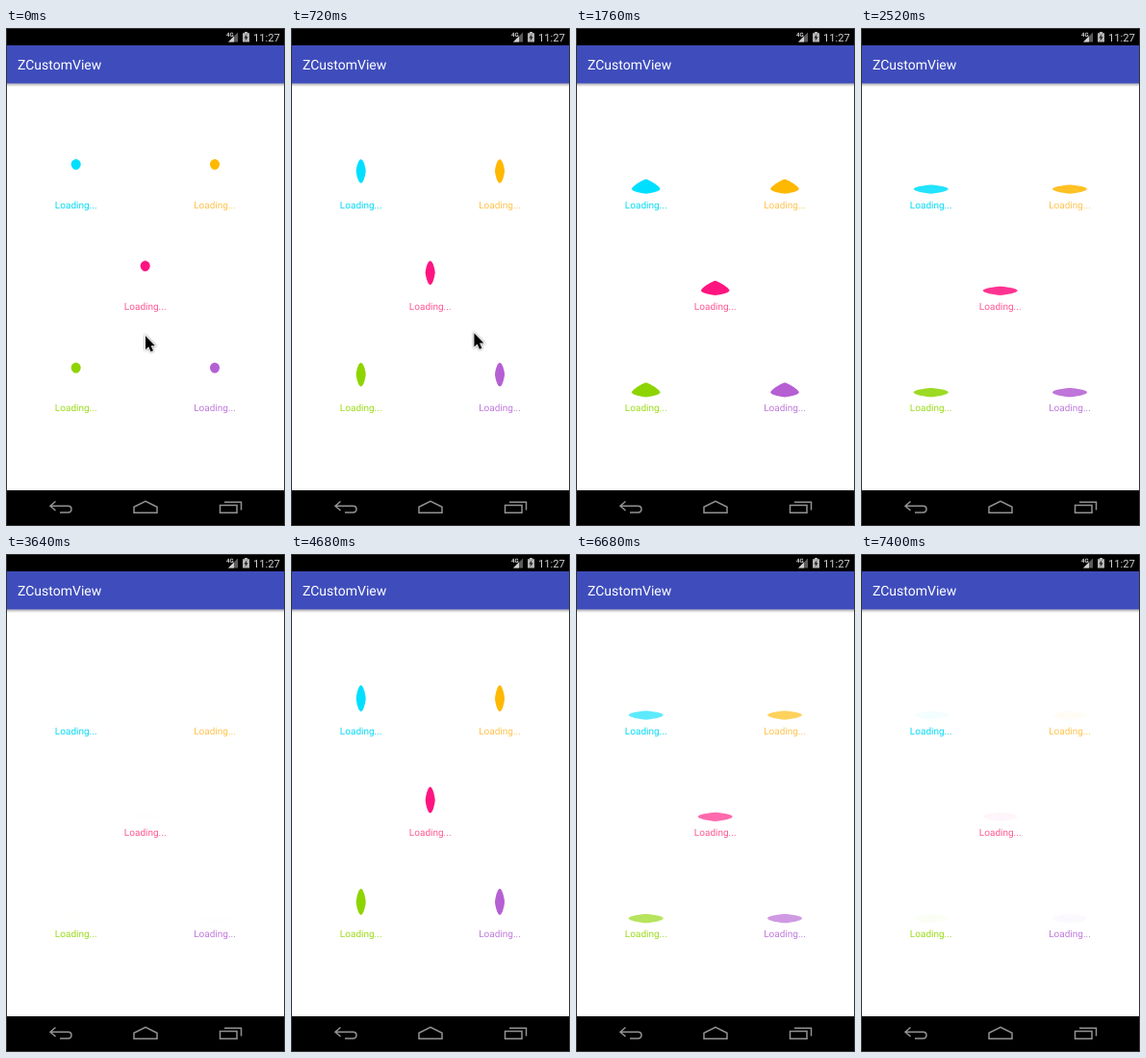
Recreate the animation shown at these times as an HTML page. Size 290 by 516 pixels, loop 7520 ms.

```html
<!DOCTYPE html>
<html lang="en">
<head>
<meta charset="utf-8">
<title>ZCustomView</title>
<style>
  html, body { margin: 0; width: 290px; height: 516px; overflow: hidden; background: #fff; }
  svg { display: block; font-family: Roboto, "Open Sans", sans-serif; text-rendering: geometricPrecision; }
</style>
</head>
<body>
<svg width="290" height="516" viewBox="0 0 290 516">
  <defs>
    <linearGradient id="shade" x2="0" y2="1">
      <stop stop-color="#000" stop-opacity=".3"/>
      <stop offset="1" stop-color="#000" stop-opacity="0"/>
    </linearGradient>
  </defs>

  <rect width="290" height="18"/>
  <rect y="18" width="290" height="39.5" fill="#3f4dbc"/>
  <rect y="57.5" width="290" height="3.5" fill="url(#shade)"/>
  <rect y="479" width="290" height="37"/>
  <rect x=".5" y=".5" width="289" height="515" fill="none" stroke="#333"/>
  <text x="12" y="43" font-size="14" fill="#fff">ZCustomView</text>

  <!-- status icons -->
  <g fill="#d0d0d0">
    <text x="257" y="14" font-size="11.2">11:27</text>
    <text x="229" y="9" font-size="6" font-weight="700">4G</text>
    <path d="M231 14.5L241 4.5V14.5Z" fill="#5c5c5c"/>
    <path d="M231 14.5L237 8.5V14.5Z"/>
    <path d="M246 5.2h2v-1.2h3v1.2h2v9.3h-7Z" fill="#b4b4b4"/>
    <path d="M250.3 6.2L247.4 10.4H249.2L248.6 13.4L251.6 9.2H249.8Z" fill="#222"/>
  </g>

  <!-- navigation icons -->
  <g fill="none" stroke="#929292" stroke-width="1.5">
    <path d="M51.5 490.5L46 495.2L51.5 500M46.5 495.2H64.5Q68 495.2 68 498.5T64.5 502H56"/>
    <path d="M133 502.3V496.3L145 490.3L157 496.3V502.3Z"/>
    <path d="M222.5 494.5H240V502.3H222.5ZM227 491.3H244.5V499.5"/>
  </g>

  <g id="loaders"></g>
  <path id="cursor" d="M0 0V14.2L3.2 11.2L5.5 16.4L8 15.3L5.7 10.2H10Z"
        stroke="#fff" stroke-width="1.6" paint-order="stroke"
        style="filter:drop-shadow(.6px .8px .8px #0008)"/>
</svg>
<script>
const LOOP = 7520, STEP = 40, CYCLE = 3890, LEAD = 130;
// x, y offset, drop colour, label colour
const loaders = [
  [72.7, 0, '#00dfff', '#00daf5'],
  [217, 0, '#ffb800', '#ffc24c'],
  [144.7, 105.3, '#ff1480', '#ff5592'],
  [72.7, 210.7, '#8ed400', '#9bdb18'],
  [217, 210.7, '#b55fd3', '#be78da']
];

document.getElementById('loaders').innerHTML = loaders.map(([x, y, color, label]) =>
  `<g transform="translate(${x} ${y})"><path fill="${color}"/>` +
  `<text y="186.5" font-size="10" text-anchor="middle" fill="${label}">Loading...</text></g>`).join('');
const drops = document.querySelectorAll('#loaders path');
const cursor = document.getElementById('cursor');

// Progress from 0 to 1 between two times.
const ramp = (t, from, to) => Math.min(1, Math.max(0, (t - from) / (to - from)));

// Four curves whose handles keep their length while the anchors move.
function dropPath(top, mid, bottom, w) {
  const k = 2.75;
  return `M0 ${top}C${k} ${top} ${w} ${mid - k} ${w} ${mid}` +
    `C${w} ${mid + k} ${k} ${bottom} 0 ${bottom}` +
    `C${-k} ${bottom} ${-w} ${mid + k} ${-w} ${mid}` +
    `C${-w} ${mid - k} ${-k} ${top} 0 ${top}Z`;
}

// The bottom falls first, then the sides, then the top; last it spreads flat.
function pose(p) {
  const spread = ramp(p, 1370, 2330);
  return dropPath(
    136 + 14 * ramp(p, 1050, 1370) + 12.4 * spread,
    141.2 + 25.6 * ramp(p, 300, 1370) ** 2,
    146.5 + 25.2 * ramp(p, 0, 1130) ** 2,
    5 + 13 * Math.sin(spread * Math.PI / 2));
}

function draw(now) {
  const tick = Math.floor(now % LOOP / STEP) * STEP;
  const t = tick < 160 ? 0 : Math.min(tick, 7400); // rests at both ends of the loop
  const phase = (t + LEAD) % CYCLE;
  const opacity = (1 + Math.cos(Math.PI * ramp(phase, 2270, 3840))) / 2;
  const d = pose(phase);
  for (const drop of drops) {
    drop.setAttribute('d', d);
    drop.setAttribute('opacity', opacity);
  }
  const move = ramp(t, 160, 1640);
  cursor.setAttribute('transform', `translate(${145 + 120 * move} ${319 - 7 * move})`);
  cursor.setAttribute('visibility', move < 1 ? 'visible' : 'hidden');
}

const start = performance.now();
function loop() {
  draw(performance.now() - start);
  requestAnimationFrame(loop);
}
loop();
</script>
</body>
</html>
```
